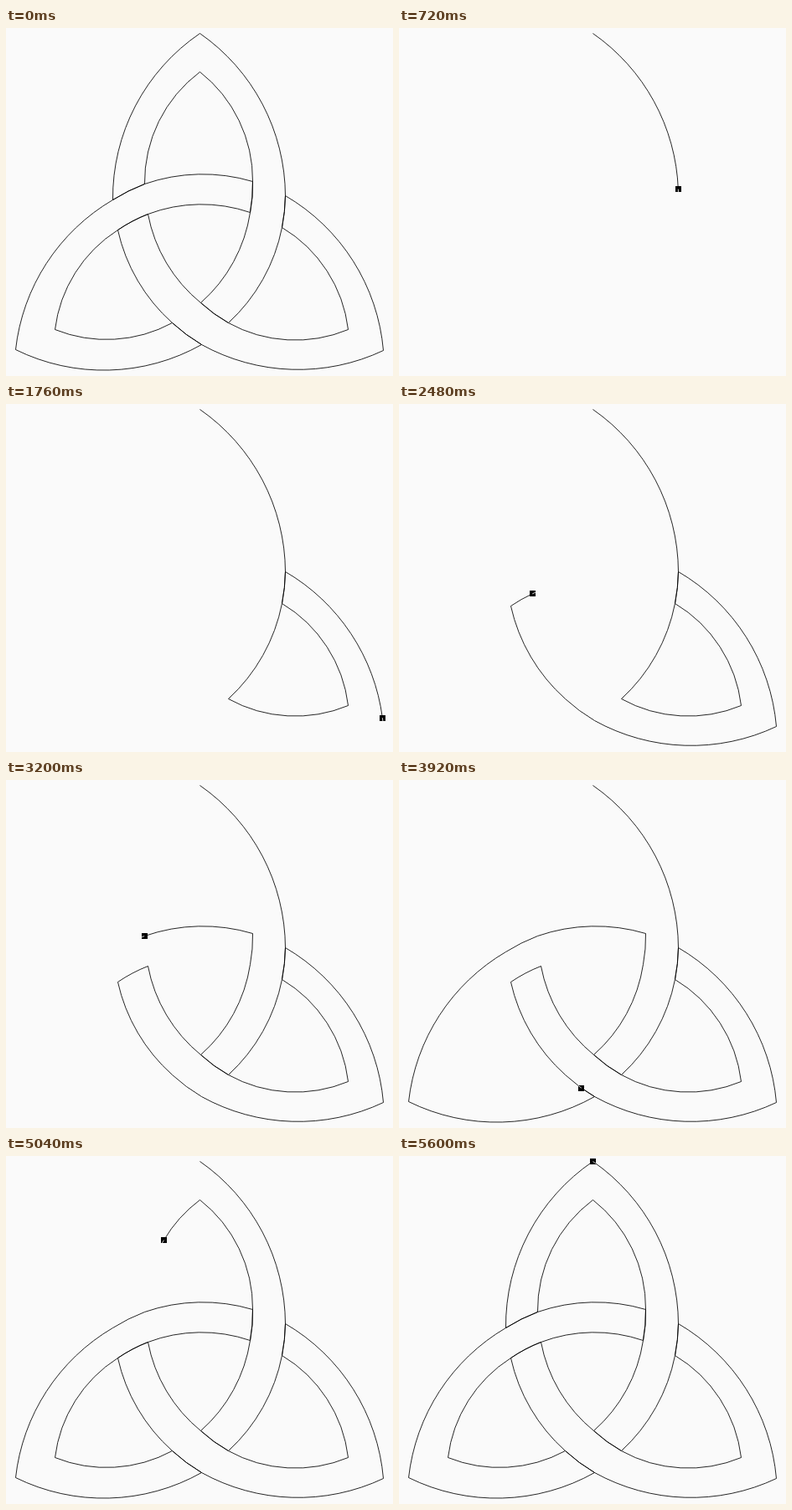
Animation of 462x416 px, one loop 6 s. Source, as an HTML page with a canvas:

```html
<!DOCTYPE html>
<html lang="en">
<head>
<meta charset="utf-8">
<title>Triquetra</title>
<style>
html, body { margin: 0; width: 100%; height: 100%; overflow: hidden; background: #fafafa; }
canvas { display: block; }
</style>
</head>
<body>
<canvas id="stage" width="462" height="416"></canvas>
<script>
const LOOP = 6000, TICK = 80, PAPER = '#fafafa', INK = '#000';
const ctx = document.getElementById('stage').getContext('2d');

// Outer tips (capitals), inner tips (t r l) and crossings of the bands.
const corner = {
  T: [231, 6], R: [450, 385], L: [11, 384],
  t: [231, 52], r: [408, 360], l: [58, 360],
  a: [333, 200], b: [329, 238], c: [265, 352], d: [232, 328],
  e: [233, 378], f: [198, 352], g: [133, 241], h: [169, 222],
  i: [127, 205], j: [165, 186], k: [294, 183], m: [291, 220]
};
const MIDDLE = [231, 258];

// Corners in the order the pen visits them, with the kind of arc between.
const walk = ('T O a o b o c I r I b o a O R O e o f o g i h i d i c i d i m i k o j o i O L ' +
  'O e o f I l I g i h i m i k I t I j o i O T').split(' ');
const radius = { O: 238, o: 210, I: 165, i: 180 };

// Every arc bulges away from the middle of the knot.
function arc(p, q, r) {
  const dx = q[0] - p[0], dy = q[1] - p[1], chord = Math.hypot(dx, dy);
  const mx = (p[0] + q[0]) / 2, my = (p[1] + q[1]) / 2;
  const side = Math.sign(dx * (MIDDLE[1] - my) - dy * (MIDDLE[0] - mx));
  const h = side * Math.sqrt(r * r - chord * chord / 4) / chord;
  const cx = mx - dy * h, cy = my + dx * h;
  const from = Math.atan2(p[1] - cy, p[0] - cx);
  const sweep = side * 2 * Math.asin(chord / 2 / r);
  return {
    length: Math.abs(sweep) * r,
    draw(k0, k1) {
      ctx.beginPath();
      ctx.arc(cx + 0.5, cy + 0.5, r, from + sweep * k0, from + sweep * k1, sweep < 0);
      ctx.stroke();
    },
    at: k => [cx + r * Math.cos(from + sweep * k), cy + r * Math.sin(from + sweep * k)]
  };
}

const arcs = [];
let total = 0;
for (let n = 0; n + 2 < walk.length; n += 2) {
  const part = arc(corner[walk[n]], corner[walk[n + 2]], radius[walk[n + 1]]);
  part.start = total;
  total += part.length;
  arcs.push(part);
}

function trace(from, to) {
  for (const p of arcs) {
    const k0 = Math.max(0, (from - p.start) / p.length);
    const k1 = Math.min(1, (to - p.start) / p.length);
    if (k0 < k1) p.draw(k0, k1);
  }
}

function penAt(s) {
  const p = arcs.filter(p => p.start <= s).pop();
  return p.at(Math.min(1, (s - p.start) / p.length)).map(Math.round);
}

// Bursts of steps with one held tick between them; the first burst is slow.
const bursts = [7, 2, 3, 2, 4, 2, 3, 4, 1, 3, 4, 3, 1, 3, 3, 3, 3, 2];
const progress = [null];
let units = -1 / 3;
bursts.forEach((count, n) => {
  for (let i = 0; i < count; i++) progress.push(units += n ? 1 : 1 / 3);
  progress.push(units);
});

function draw(tick) {
  const done = progress[Math.min(tick, progress.length - 1)];
  const s = done === null ? total : total * done / units;
  ctx.fillStyle = PAPER;
  ctx.fillRect(0, 0, 462, 416);
  ctx.lineWidth = 0.85;
  ctx.strokeStyle = INK;
  trace(0, s);
  if (done === null) return;

  // The way ahead shows light inside the pen.
  const [x, y] = penAt(s);
  ctx.save();
  ctx.beginPath();
  ctx.rect(x - 3, y - 3, 7, 7);
  ctx.clip();
  ctx.fillStyle = INK;
  ctx.fillRect(x - 3, y - 3, 7, 7);
  ctx.strokeStyle = PAPER;
  trace(s, s + 8);
  trace(0, s + 8 - total);
  ctx.restore();
}

let shown = -1;
const begin = performance.now();
function frame(now) {
  const tick = Math.floor(Math.max(0, now - begin) % LOOP / TICK);
  if (tick !== shown) draw(tick);
  shown = tick;
  requestAnimationFrame(frame);
}
frame(begin);
</script>
</body>
</html>
```
